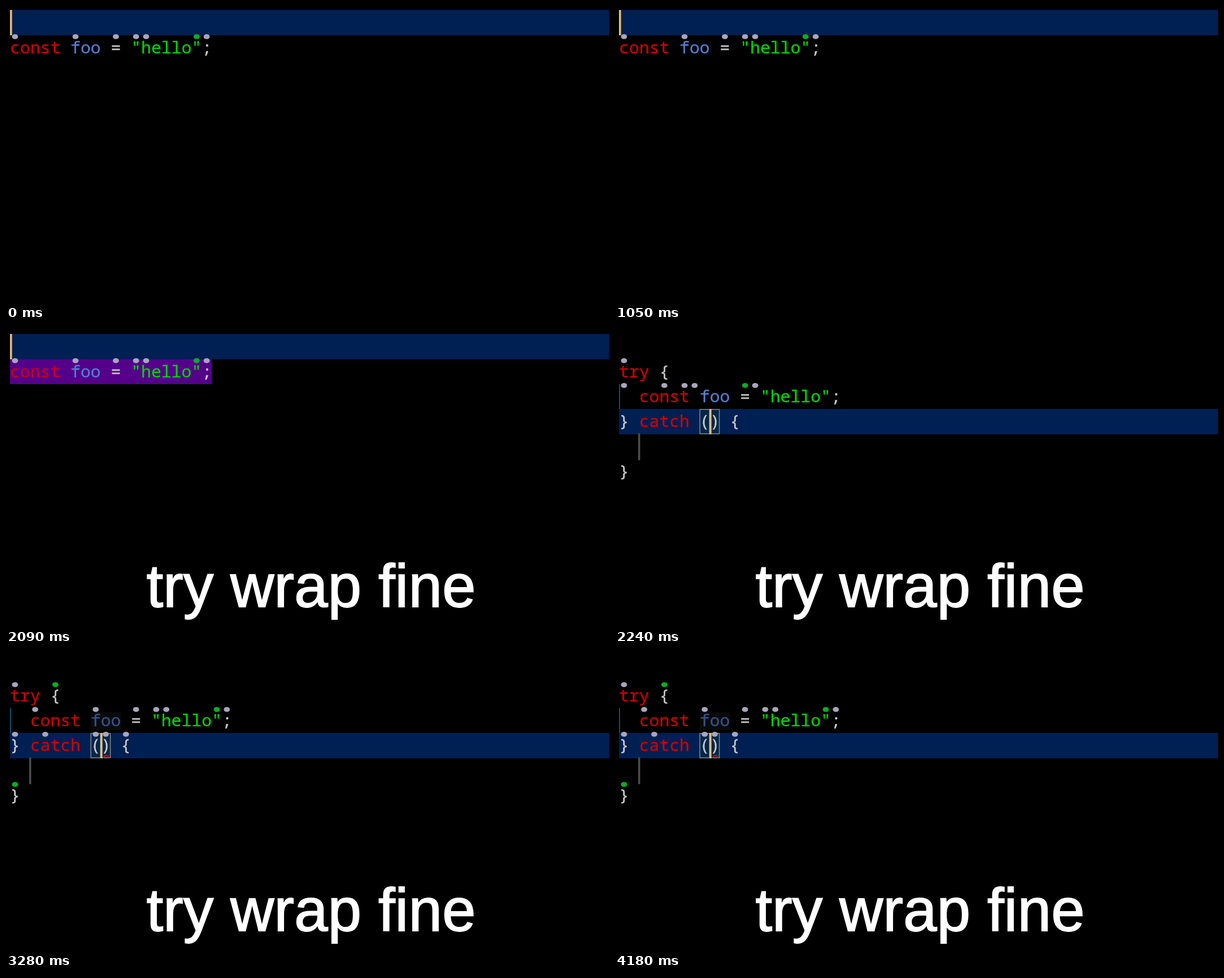
These frames come from a looping animation (1067 px wide and 525 px high, 4620 ms). An HTML page:

```html
<!DOCTYPE html>
<html lang="en">
<head>
<meta charset="utf-8">
<title>Wrap in try</title>
<style>
  html, body { margin: 0; width: 100%; height: 100%; overflow: hidden; background: #000; }
  svg { display: block; width: 1067px; height: 525px; }
  text { font-variant-ligatures: none; white-space: pre; }
  .code { font: 29.75px "Noto Sans Mono", "DejaVu Sans Mono", monospace; stroke-width: 0.35px; }
  .caption { font: 107px "Liberation Sans", Arial, sans-serif; font-kerning: none; stroke-width: 1.8px; }
</style>
</head>
<body>
<svg viewBox="0 0 1067 525"></svg>
<script>
const LOOP = 4620;
const CELL = 17.85, LINE = 44.4, LEFT = 7, TOP = 7.2;
const RED = '#d00000', BLUE = '#4f80d4', DIM_BLUE = '#34528c', GREEN = '#00d400', PLAIN = '#c8c8c8';
const HAT = '#a9a5bc', GREEN_HAT = '#08ae24';

// Moments of change, in ms
const SELECT = 2090, WRAP = 2240, REHAT = 2380, CHECK = 2530;

const svg = document.querySelector('svg');
const colX = col => LEFT + col * CELL;
const lineY = line => Math.round(TOP + line * LINE);
const lineHeight = line => lineY(line + 1) - lineY(line);

function add(parent, tag, attrs = {}, content = '') {
  const node = document.createElementNS('http://www.w3.org/2000/svg', tag);
  for (const [name, value] of Object.entries(attrs)) node.setAttribute(name, value);
  node.textContent = content;
  parent.append(node);
  return node;
}

const box = (parent, x, y, width, height, fill) =>
  add(parent, 'rect', { x, y, width, height, fill });

const lineBox = (parent, x, line, width, fill) =>
  box(parent, x, lineY(line), width, lineHeight(line), fill);

const label = (parent, className, x, y, color, content) =>
  add(parent, 'text', { class: className, x, y, fill: color, stroke: color }, content);

// A group visible only during the given [from, to] spans
function layer(...spans) {
  const group = add(svg, 'g');
  const frames = [];
  if (spans[0][0] > 0) frames.push({ offset: 0, opacity: 0 });
  for (const [from, to] of spans) {
    frames.push({ offset: from / LOOP, opacity: 1 });
    frames.push({ offset: to / LOOP, opacity: to === LOOP ? 1 : 0 });
  }
  if (frames.at(-1).offset < 1) frames.push({ offset: 1, opacity: 0 });
  for (const frame of frames) frame.easing = 'step-end';
  group.animate(frames, { duration: LOOP, iterations: Infinity });
  return group;
}

function write(parent, line, ...tokens) {
  for (const [col, content, color] of tokens)
    label(parent, 'code', colX(col), lineY(line) + 32.3, color, content);
}

function statement(parent, line, col) {
  write(parent, line, [col, 'const', RED], [col + 10, '=', PLAIN],
    [col + 12, '"hello"', GREEN], [col + 19, ';', PLAIN]);
}

function hats(parent, line, cols, fill = HAT) {
  for (const col of cols)
    add(parent, 'ellipse', { cx: colX(col + 0.5), cy: lineY(line) + 2.4, rx: 5.4, ry: 4.4, fill });
}

const activeLine = (parent, line) => lineBox(parent, LEFT, line, 1060, '#001f53');
const cursor = (parent, x, line) => lineBox(parent, x, line, 3.7, '#e0bb7d');

// Single statement
const before = layer([0, WRAP]);
activeLine(before, 0);
lineBox(layer([SELECT, WRAP]), LEFT, 1, 20 * CELL, '#55008b');
const single = layer([0, WRAP]);
statement(single, 1, 0);
write(single, 1, [6, 'foo', BLUE]);
hats(single, 1, [0, 6, 10, 12, 13, 19]);
hats(single, 1, [18], GREEN_HAT);
cursor(layer([0, 600], [1050, 1500], [SELECT, WRAP]), LEFT, 0);

// Wrapped statement
const after = layer([WRAP, LOOP]);
activeLine(after, 3);
lineBox(after, LEFT, 2, 2, '#10506f');
for (const x of [150.2, 167.4])
  add(after, 'rect', {
    x, y: lineY(3) + 0.8, width: 17.2, height: lineHeight(3) - 1.6,
    fill: '#00264b', stroke: '#858985', 'stroke-width': 1.5
  });
box(after, 41, 183.5, 3.5, 47.5, '#4d4d4d');
write(after, 1, [0, 'try', RED], [4, '{', PLAIN]);
statement(after, 2, 2);
write(after, 3, [0, '}', PLAIN], [2, 'catch', RED], [8, '(', PLAIN], [9, ')', PLAIN], [11, '{', PLAIN]);
write(after, 5, [0, '}', PLAIN]);

write(layer([WRAP, CHECK]), 2, [8, 'foo', BLUE]);
const checked = layer([CHECK, LOOP]);
box(checked, colX(8), lineY(2) + 7, 3 * CELL, 32, '#0a0a0a');
write(checked, 2, [8, 'foo', DIM_BLUE]);
add(checked, 'path', {
  d: 'M172 184.5 Q177.5 175.5 183 184.5', fill: 'none', stroke: '#e00018', 'stroke-width': 2
});

const oldHats = layer([WRAP, REHAT]);
hats(oldHats, 1, [0]);
hats(oldHats, 2, [0, 4, 6, 7, 13]);
hats(oldHats, 2, [12], GREEN_HAT);

const newHats = layer([REHAT, LOOP]);
hats(newHats, 1, [0]);
hats(newHats, 1, [4], GREEN_HAT);
hats(newHats, 2, [2, 8, 12, 14, 15, 21]);
hats(newHats, 2, [20], GREEN_HAT);
hats(newHats, 3, [0, 3, 8, 9, 11]);
hats(newHats, 5, [0], GREEN_HAT);

cursor(layer([WRAP, 2680], [3280, 3730], [4180, LOOP]), 167, 3);

// Spoken command
label(layer([SELECT, LOOP]), 'caption', 248.4, 490.5, '#fff', 'try wrap fine');
</script>
</body>
</html>
```
